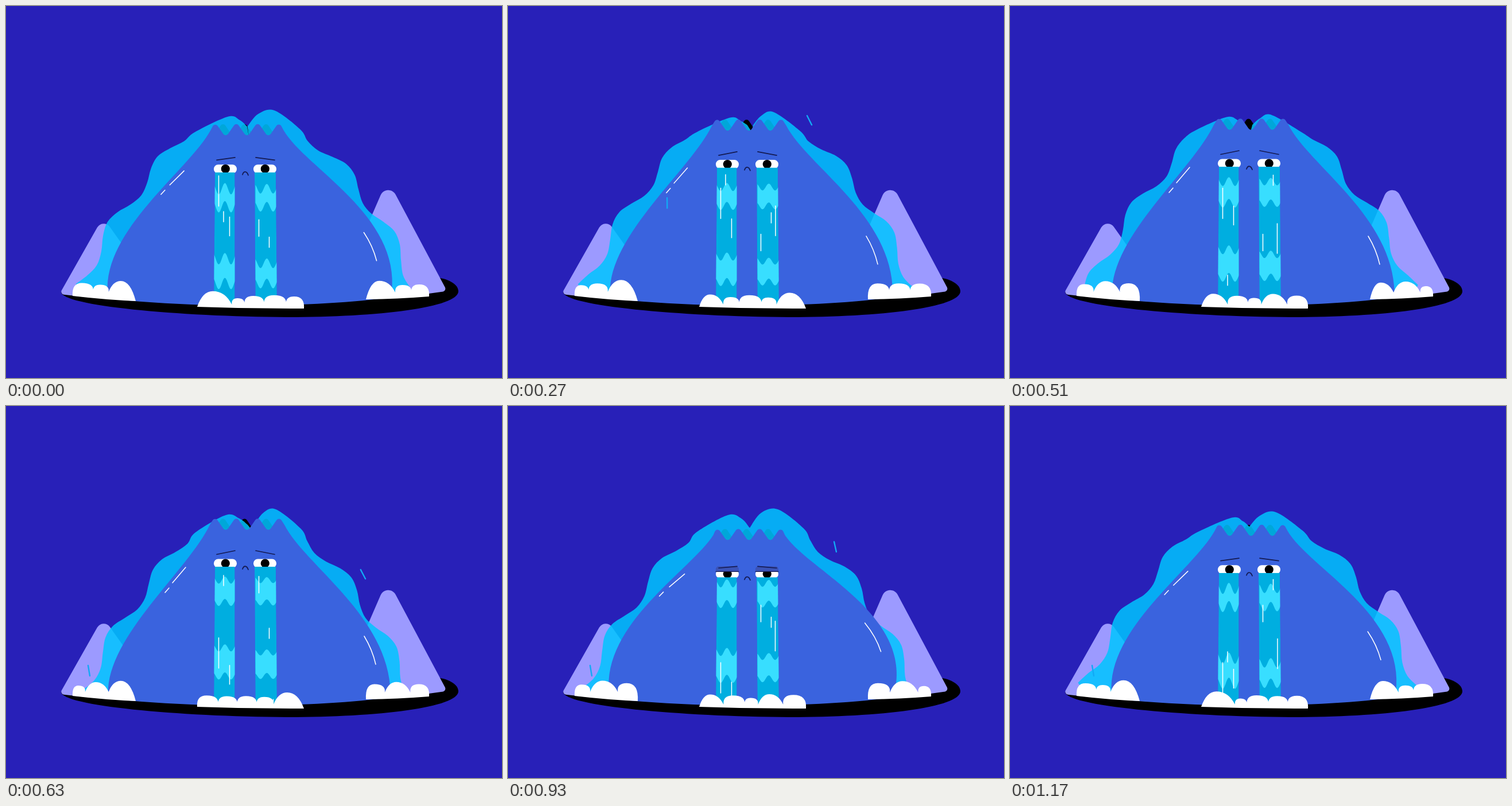
These frames come from a looping animation (864 px wide and 648 px high, 1.2 s). An HTML page with a canvas:

```html
<!DOCTYPE html>
<html lang="en">
<head>
<meta charset="utf-8">
<title>Crying mountain</title>
<style>
html, body { margin: 0; width: 100%; height: 100%; overflow: hidden; background: #2820b8; }
canvas { display: block; width: 864px; height: 648px; }
</style>
</head>
<body>
<canvas id="stage" width="864" height="648"></canvas>
<script>
const c = document.getElementById('stage').getContext('2d');
const LOOP = 1200, STEP = 30, TAU = Math.PI * 2;
const INK = '#141a52';

const mix = (a, b, k) => a + (b - a) * k;
const mixAll = (a, b, k) => a.map((v, i) => mix(v, b[i], k));
const wave = (t, period, peak = 0) => Math.cos(TAU * (t - peak) / period);
const ease = (t, from, to) => {
  const k = Math.min(1, Math.max(0, (t - from) / (to - from)));
  return (1 - Math.cos(Math.PI * k)) / 2;
};

// A sob: a quick slump, then a slow rise that runs on past the loop point.
// 0 is stretched, 1 is squashed.
function squash(t) {
  if (t < 640) t += LOOP;
  return t < 740 ? ease(t, 640, 740) : 1 - ease(t, 740, 1630);
}

const lidDrop = t => ease(t, 650, 740) * (1 - ease(t, 960, 1120));

// Smooth curve through points, continuing the current path.
function spline(p) {
  for (let i = 0; i < p.length - 1; i++) {
    const a = p[i - 1] || p[i], b = p[i], d = p[i + 1], e = p[i + 2] || d;
    c.bezierCurveTo(b[0] + (d[0] - a[0]) / 6, b[1] + (d[1] - a[1]) / 6,
      d[0] - (e[0] - b[0]) / 6, d[1] - (e[1] - b[1]) / 6, d[0], d[1]);
  }
}

function fill(color, draw) {
  c.beginPath();
  draw();
  c.closePath();
  c.fillStyle = color;
  c.fill();
}

function line(x1, y1, x2, y2, color = '#fff', w = 1.5) {
  c.beginPath();
  c.moveTo(x1, y1);
  c.lineTo(x2, y2);
  c.strokeStyle = color;
  c.lineWidth = w;
  c.stroke();
}

function ground() {
  fill('#000', () => {
    c.moveTo(96, 498);
    c.bezierCurveTo(96, 522, 300, 541, 490, 542);
    c.bezierCurveTo(650, 542, 788, 525, 788, 497);
    c.bezierCurveTo(788, 485, 772, 476, 752, 473);
    c.lineTo(640, 490);
  });
  fill('#9c9aff', () => {
    c.moveTo(130, 506);
    c.arcTo(94, 502, 100, 488, 5);
    c.arcTo(169, 368, 235, 461, 13);
    c.lineTo(235, 461);
    c.lineTo(235, 513);
  });
  fill('#9c9aff', () => {
    c.moveTo(582, 492);
    c.arcTo(664.5, 302, 764, 488, 14.5);
    c.arcTo(768, 496, 740, 502, 5);
    c.quadraticCurveTo(680, 510, 600, 512);
  });
}

function farRim(top) {
  for (const x of [378, 415.5, 453]) fill('#000', () => {
    c.moveTo(x - 18, top + 23);
    c.arcTo(x, top - 4, x + 18, top + 23, 5);
    c.lineTo(x + 18, top + 23);
  });
}

// One flank of the water: a wave travelling down a slanted line.
function flank(t, x, y, dx, dy, peak, swell, span) {
  const len = Math.hypot(dx, dy), ux = dx / len, uy = dy / len, out = Math.sign(dx), pts = [];
  for (let a = 36; a <= 372; a += 24) {
    const amp = 4 + 7 * Math.min(1, a / 100);
    const n = swell * Math.sin(Math.PI * a / span) + 5 * wave(t, LOOP) * Math.min(1, a / 150) +
      amp * Math.cos(TAU * ((a - peak) / 143 - t / 300));
    pts.push([x + ux * a + out * uy * n, y + uy * a - out * ux * n]);
  }
  return pts;
}

function water(t, s, top) {
  const left = flank(t, 350, 190, -210, 300, 108, 20, 420).reverse();
  const right = flank(t, 485, 190, 215, 300, 140, 27, 400);
  const jx = 415 + 6 * wave(t, 300, 330), jy = 207 + 6 * s;
  const gap = 12 * Math.max(0, 1 - 2 * s);
  const crestL = [377 + 10 * wave(t, 300, 285), 190.5 + 4.5 * wave(t, 300, 250)];
  const crestR = [463 + 8 * wave(t, 300, 45), 185 + 5 * wave(t, 300, 195)];
  fill('rgba(0,197,255,.85)', () => {
    c.moveTo(135, 506);
    c.lineTo(...left[0]);
    spline([...left, crestL, [mix(crestL[0], jx, .62), crestL[1] + 6], [jx, jy]]);
    if (gap) c.lineTo(jx + gap / 2 + 3, top + 22);
    c.lineTo(jx + gap, jy);
    spline([[jx + gap, jy], [mix(jx + gap, crestR[0], .4), crestR[1] + 6], crestR, ...right]);
    c.lineTo(700, 507);
    c.lineTo(430, 522);
  });
}

function body(s, top) {
  // each side is one Bezier between its stretched and squashed form
  const l = mixAll([178, 500, 176, 402, 318, 285, 355, 207],
    [176, 500, 162, 377, 318, 287, 358, 227], s);
  const r = mixAll([485, 207, 521, 278, 667, 366, 670, 500],
    [482, 227, 523, 288, 711, 362, 674, 500], s);
  fill('#3a63de', () => {
    c.moveTo(l[0], l[1]);
    c.bezierCurveTo(...l.slice(2));
    const rim = [];
    for (let i = 0; i < 7; i++) rim.push([364 + i * 18.6, i % 2 ? top + 23 : top - 4]);
    rim.push([r[0], r[1]]);
    for (let i = 0; i < 7; i++) c.arcTo(...rim[i], ...rim[i + 1], 5);
    c.lineTo(r[0], r[1]);
    c.bezierCurveTo(...r.slice(2));
    c.lineTo(r[6], 507);
    c.bezierCurveTo(560, 524, 330, 528, l[0], 509);
  });
  line(...mixAll([313, 281, 290, 308], [307, 294, 280, 316], s));
  line(...mixAll([284, 317, 277, 325], [269, 325, 262, 332], s));
  const g = mixAll([624, 401, 638, 424, 644, 450], [621, 372, 642, 396, 651, 422], s * s);
  c.beginPath();
  c.moveTo(g[0], g[1]);
  c.quadraticCurveTo(...g.slice(2));
  c.stroke();
}

// x, length, speed, period, delay
const STREAKS = [
  [[370.5, 53, .72, 240, 8], [389.5, 33, .86, 266, 90], [379, 18, .73, 358, 93]],
  [[440.5, 29, .84, 240, 98], [458.5, 18, .77, 325, 146],
    [465.5, 52, 1.1, 424, 419], [466, 52, 1.1, 424, 207]]];

function tear(t, eye, side) {
  const [x0, x1, b0, b1] = side ? [433, 470, 434.5, 472] : [364, 398.5, 362, 398.5];
  const y0 = eye + 6;
  c.save();
  c.beginPath();
  c.moveTo(x0, y0);
  c.lineTo(x1, y0);
  c.lineTo(b1, 521);
  c.lineTo(b0, 521);
  c.clip();
  c.fillStyle = '#00aee0';
  c.fill();
  const amp = (8 + 2 * wave(t, 400)) * (side ? .85 : 1);
  const edge = y => {
    const pts = [];
    for (let u = 0; u <= 1.001; u += .05)
      pts.push([mix(b0, b1 + 1, u), y + amp * Math.sin(TAU * (1.75 * u - .15))]);
    return pts;
  };
  const sway = wave(t, LOOP, 80), low = side ? 8 : 0;
  for (const [from, to] of [[311 + 8 * sway, 346 + 4 * sway],
    [431 + low + 10 * sway, 477 + 7 * sway]])
    fill('#38deff', () => [...edge(from), ...edge(to).reverse()].forEach(p => c.lineTo(...p)));
  for (const [x, len, speed, period, delay] of STREAKS[side]) {
    const y = 290 + speed * ((t + delay) % period);
    line(x, y, x, y + len);
  }
  c.restore();
}

function face(t, s) {
  const eye = 274 + 20.5 * s, lid = lidDrop(t);
  const outer = eye - 15.5 + .5 * s + 5 * lid, inner = eye - 22 + 4.5 * s + 5 * lid;
  for (const side of [0, 1]) {
    const x = side ? 451 : 382;
    fill('#fff', () => c.roundRect(x - 20, eye - 7.5, 40, 15.5, 7.5));
    fill('#000', () => c.arc(x + .3, eye, 7.6, 0, TAU));
    if (lid > 0) {
      const y = eye - 8 + 4 * lid, h = 9 * lid;
      fill('#3a53b8', () => c.roundRect(x - 20, y - h, 40, h, [5 * lid, 5 * lid, 0, 0]));
      line(x - 20, y, x + 20, y, INK, 1.2);
    }
    tear(t, eye, side);
  }
  line(367, outer, 399, inner, INK, 1.7);
  line(435, inner, 468, outer, INK, 1.7);
  c.beginPath();
  c.moveTo(412, eye + 10);
  c.bezierCurveTo(414, eye + 4, 419, eye + 3, 422, eye + 11);
  c.lineWidth = 1.8;
  c.stroke();
}

// A row of bumps that trade width with each other; wider ones stand taller.
function foam(t, [x0, y0], [x1, y1], base, sizes) {
  const w = sizes.map((v, i) => v * (1 + .28 * wave(t, 400, i * 160)));
  const scale = (x1 - x0) / w.reduce((a, b) => a + b);
  fill('#fff', () => {
    let x = x0;
    c.moveTo(x0, y0);
    w.forEach((v, i) => {
      const size = v * scale, last = i === w.length - 1;
      const px = x + size * .45, py = base - 8 - size * .32;
      const nx = x + size, ny = last ? y1 : base - 4;
      c.quadraticCurveTo(mix(x, px, size > 40 ? .35 : -.1), py, px, py);
      c.quadraticCurveTo(mix(px, nx, size > 40 ? .65 : 1.1), py, nx, ny);
      x = nx;
    });
    c.quadraticCurveTo((x0 + x1) / 2, (y0 + y1) / 2 + 2, x0, y0);
  });
}

// Start time, place and speed of each flying drop
const DROPS = [
  [130, 497, 189, .2, -.25], [150, 276, 262, .01, .4], [330, 184, 326, -.03, .7],
  [600, 612, 276, .33, .5], [870, 561, 213, .15, .4]];

function drops(t) {
  const color = '#12a9f5', pull = .0023;
  for (const [t0, x, y, vx, vy] of DROPS) {
    const d = t - t0;
    if (d < 0 || d > 170) continue;
    const fall = vy + 2 * pull * d, k = 9 / Math.hypot(vx, fall);
    const px = x + vx * d, py = y + vy * d + pull * d * d;
    line(px - vx * k, py - fall * k, px + vx * k, py + fall * k, color, 2.4);
  }
  if (t >= 600) line(143, 452, 146, 470, color, 2.4);
}

function draw(t) {
  const s = squash(t), top = 196.5 + 20 * s;
  c.fillStyle = '#2820b8';
  c.fillRect(0, 0, 864, 648);
  c.lineCap = 'round';
  ground();
  farRim(top);
  water(t, s, top);
  body(s, top);
  face(t, s);
  drops(t);
  foam(t, [116, 505], [226, 514], 502, [29, 36, 45]);
  foam(t, [333, 524], [519, 527], 524, [48, 29, 32, 36, 41]);
  foam(t, [627, 511], [737, 506], 503, [42, 38, 30]);
}

const start = performance.now();
function tick() {
  const t = (performance.now() - start) % LOOP;
  draw(Math.floor(t / STEP) * STEP);
  requestAnimationFrame(tick);
}
tick();
</script>
</body>
</html>
```
